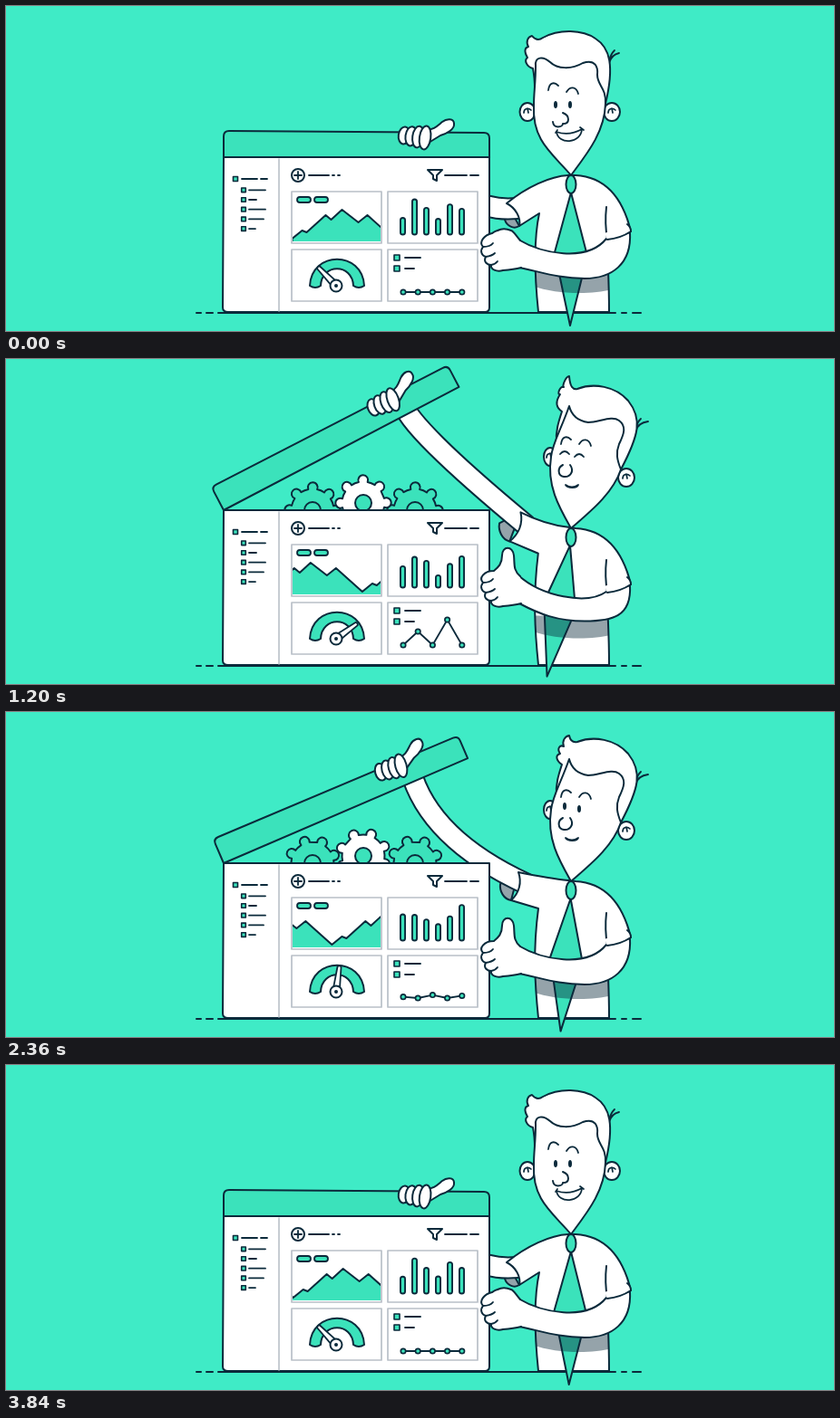
Animation, 913 px wide and 359 px high, one loop 3880 ms. Source, as an HTML page with a canvas:

```html
<!DOCTYPE html>
<html lang="en">
<head>
<meta charset="utf-8">
<title>Dashboard box</title>
<style>
html, body { margin: 0; width: 100%; height: 100%; overflow: hidden; background: #3febc6; }
canvas { display: block; }
</style>
</head>
<body>
<canvas width="913" height="359"></canvas>
<script>
const ctx = document.querySelector('canvas').getContext('2d');
const LOOP = 3880, STEP = 40;
const BG = '#3febc6', GREEN = '#3be2bb', INK = '#0b2a3b', WHITE = '#fff', PALE = '#b9c0c8', SHADE = '#94a4ab';
const rad = deg => deg * Math.PI / 180;
const lerp = (a, b, k) => a + (b - a) * k;

// Smooth step from 0 to 1 between two times, and a rise followed by a fall.
function ease(t, from, to) {
  const u = Math.max(0, Math.min(1, (t - from) / (to - from)));
  return u * u * (3 - 2 * u);
}
const pulse = (t, a, b, c, d) => ease(t, a, b) - ease(t, c, d);

function swing(t, start, size) {
  const s = t - start;
  return s < 0 ? 0 : size * Math.exp(-s / 350) * Math.sin(Math.PI * s / 600);
}

// Blends two path strings of equal structure.
function mix(a, b, k) {
  const other = b.match(/-?[\d.]+/g);
  let i = 0;
  return a.replace(/-?[\d.]+/g, n => lerp(+n, +other[i++], k).toFixed(2));
}

function shape(d, fill, stroke = INK, width = 2) {
  const path = new Path2D(d);
  if (fill) { ctx.fillStyle = fill; ctx.fill(path); }
  if (stroke) { ctx.strokeStyle = stroke; ctx.lineWidth = width; ctx.stroke(path); }
}
const line = (d, width = 1.8, color = INK) => shape(d, null, color, width);

function oval(x, y, rx, ry, fill, width = 2, tilt = 0) {
  ctx.beginPath();
  ctx.ellipse(x, y, rx, ry, rad(tilt), 0, 7);
  ctx.fillStyle = fill;
  ctx.fill();
  if (width) { ctx.strokeStyle = INK; ctx.lineWidth = width; ctx.stroke(); }
}

function at(x, y, deg, draw) {
  ctx.save();
  ctx.translate(x, y);
  ctx.rotate(rad(deg));
  draw();
  ctx.restore();
}

function gear(x, y, fill, turn) {
  const r = 23.5, p = deg => `${r * Math.sin(rad(deg))} ${-r * Math.cos(rad(deg))}`;
  let d = '';
  for (let a = 0; a < 360; a += 45)
    d += `${a ? `A${r} ${r} 0 0 1` : 'M'} ${p(a - 12)} A5.4 5.4 0 1 1 ${p(a + 12)}`;
  at(x, y, turn, () => shape(d + 'Z', fill));
  oval(x, y, 9, 9, GREEN);
}

function square(x, y, s) {
  shape(`M${x - s / 2} ${y - s / 2}h${s}v${s}h${-s}Z`, GREEN, INK, 1.6);
}

// A repeating ridge that scrolls by one span per loop.
function areaChart(t) {
  const ridge = [[0, 257], [11, 248], [16, 250], [37, 231], [43, 236], [55, 225], [73, 239], [83, 231]];
  const span = 112, start = 315.5 - span * t / LOOP;
  let d = '';
  for (let n = 0; n < 3; n++)
    for (const [x, y] of ridge) d += `L${start + n * span + x} ${y} `;
  ctx.save();
  ctx.beginPath();
  ctx.rect(316, 206, 97, 54);
  ctx.clip();
  shape(`M${start} 300 ${d}L${start + 330} 300Z`, GREEN);
  ctx.restore();
  for (const x of [321, 340]) shape(`M${x + 3} 211h9a3 3 0 0 1 0 6h-9a3 3 0 0 1 0 -6Z`, GREEN, INK, 1.8);
}

// Each bar swings around its middle height with its own delay.
function barChart(t) {
  [[228, 0], [218.5, 485], [226.5, 600], [233, 200], [221, 310], [218, 940]].forEach(([mid, delay], i) => {
    const top = mid + 3 + 5.5 * Math.cos(2 * Math.PI * (t - delay) / 970);
    const bar = `M${437.5 + 13 * i} ${top}V250`;
    line(bar, 7);
    line(bar, 3.2, GREEN);
  });
}

function gauge(t) {
  shape('M335 309C337 270 393 270 395 309Q389 313 383 309C382 284 348 284 347 309Q341 313 335 309Z', GREEN);
  const angle = -44 + 107 * pulse(t % 1940, 60, 800, 1060, 1840);
  at(364, 309, angle, () => shape('M-3.5 -4L-2 -28Q0 -30 2 -28L3.5 -4Z', WHITE, INK, 1.8));
  oval(364, 309, 6.5, 6.5, WHITE);
  oval(364, 309, 2, 2, INK, 0);
}

function lineChart(t) {
  const early = pulse(t, 400, 1140, 1240, 1820), late = pulse(t, 2160, 2920, 3020, 3740);
  const pts = [8 * late, 15 * early, 20 * late, 28 * early, 15 * late].map((rise, i) => [438 + 16.2 * i, 316 - rise]);
  line('M' + pts.join('L'));
  for (const [x, y] of pts) oval(x, y, 2.7, 2.7, GREEN, 1.7);
  square(431, 278, 6);
  square(431, 290, 6);
  line('M440 278h17M440 290h10');
}

function box(t) {
  shape('M240 167H533V333Q533 338 528 338H245Q239 338 239 333Z', WHITE);
  line('M301 169V337', 1.6, PALE);
  square(253, 191, 5);
  line('M260 191h17M281 191h7');
  [18, 8, 18, 16, 7].forEach((length, i) => {
    const y = 203.3 + 10.7 * i;
    square(262, y, 4.6);
    line(`M268 ${y}h${length}`);
  });
  oval(322, 187, 7, 7, WHITE);
  line('M318 187h8M322 183v8M334 187h22M360 187h2M366 187h2M484 187h24M512 187h9');
  shape('M465 181h16l-6 6v6l-4 -2v-4Z', WHITE);
  areaChart(t);
  barChart(t);
  for (const x of [315, 421])
    for (const y of [205, 269]) line(`M${x} ${y}h99v57h-99Z`, 1.7, PALE);
  gauge(t);
  lineChart(t);
}

function lid(angle) {
  at(240, 167, -angle, () => {
    shape('M0 0V-23Q0 -29 6 -29L287 -27Q293 -27 293 -21V0Z', GREEN);
    shape('M222 -30C232 -30 236 -35 241 -39C246 -43 254 -43 254 -37C255 -31 246 -26 239 -24L226 -16Z', WHITE);
    for (let i = 0; i < 4; i++) oval(199 + 7.7 * i, -24 + .8 * i, 6.2, 9.5 + 1.2 * i, WHITE, 2, 8);
  });
}

function raisedArm(angle, raise) {
  const c = Math.cos(rad(angle)), s = Math.sin(rad(angle)), bend = raise ** 3;
  const arm = `M${240 + 230 * c - 14 * s} ${167 - 230 * s - 14 * c}
    Q${500 - 34 * bend} ${236 - 96 * bend} 574 ${lerp(222, 190, raise)}`;
  shape(mix('M552 218L566 243C560 247 552 243 550 236Z', 'M565 177L557 208C549 207 544 198 545 190Z', raise), SHADE);
  ctx.lineCap = 'butt';
  line(arm, 25);
  line(arm, 21, WHITE);
  ctx.lineCap = 'round';
}

function body(raise, tie, lift) {
  const sleeve = mix('M620 187C600 188 574 200 552 218C562 223 568 234 566 243L588 229',
                     'M620 186C600 184 580 180 565 177C569 188 566 200 557 208L587 217', raise);
  const shirt = sleeve + 'C581 262 583 300 587 338H665C665 300 663 280 663 257L689 249C682 220 666 189 628 187Z';
  shape(shirt, WHITE);
  at(623, 200, tie, () => shape('M0 6L18 76L-1 153L-18 72Z', GREEN));
  oval(623, 197, 5.5, 10, GREEN);
  ctx.save();
  ctx.clip(new Path2D(shirt));
  const y = 312 - lift * .45;
  shape(`M580 ${y - 20}H668V${y + 1}C645 ${y + 7} 608 ${y + 7} 580 ${y - 3}Z`, 'rgba(11,42,59,.43)', null);
  ctx.restore();
  line('M662 222Q660 240 663 257', 2);
}

function thumbArm(lift, thumb) {
  const half = lift * .6;
  shape(`M565 ${258 - lift}C590 ${273 - half} 640 ${284 - half} 662 257L688 250C690 285 668 ${301 - half} 638 ${301 - half}C608 ${301 - half} 588 ${293 - half} 566 ${289 - lift}`, WHITE);
  const cuff = 'M663 258C674 257 683 253 689 249Q689 244 685 241';
  shape(cuff + 'L660 251Z', WHITE, null);
  line(cuff, 2);
  at(0, -lift, 0, () => {
    const top = mix('M567 259C561 252 560 249 557 248C552 246 546 246 542 248C538 249 538 250 536 251',
                    'M567 259C559 252 561 246 560 236C559 225 547 225 547 236C547 245 543 249 538 253', thumb);
    shape(top + 'C527 253 521 261 526 266C522 271 525 276 529 277C526 283 531 286 535 286C534 291 541 294 548 292Q560 291 568 289', WHITE);
    line('M526 266q8 0 11 -4M529 277q7 -1 10 -4M535 286q5 -1 7 -4');
  });
}

function ear(x, y, rx) {
  oval(x, y, rx, 10, WHITE);
  line(`M${x - 4} ${y + 1}c0 -5 5 -6 8 -3m-4 -2l1 5`, 1.7);
}

function mouth(x, y, smile) {
  const w = 7 + 7 * smile, deep = 4 + 9 * smile;
  shape(`M${x - w} ${y}Q${x} ${y + 5} ${x + w} ${y - 3 * smile}C${x + w - 1} ${y + deep} ${x - w + 2} ${y + deep + 2 * smile} ${x - w} ${y}Z`, WHITE, INK, 1.8);
  if (smile > .4) line(`M${x + w - 2} ${y - 5}l4 3M${x - w - 1} ${y + 1}l2 -3`, 1.7);
}

function head(turn, tuft, smile, blink) {
  const go = (a, b) => lerp(a, b, turn), up = 7 * tuft;
  ear(go(575, 600), go(117, 108), go(8.5, 7));
  ear(go(668, 684), go(117, 131), 9);
  line(`M${go(665, 694)} ${go(63, 80)}c2 -7 6 -10 ${go(11, 14)} -11m-${go(11, 14)} 8q2 -7 6 -11`);
  shape(mix(
    'M583 92C583 82 582 74 581 69C574 67 571 60 575 57C571 50 572 46 576 45C573 40 575 34 580 33C584 38 588 38 592 35C610 25 636 26 650 36C666 46 671 66 661 108',
    `M607 92C606 80 609 70 613 58C607 54 605 48 611 ${46 - up}C607 40 611 ${36 - up} 615 ${38 - up}C613 32 616 ${27 - up} 621 ${26 - up}C622 31 625 34 630 33C648 26 672 30 686 46C702 66 698 84 678 122`, turn), WHITE);
  shape(mix(
    'M584 66C583 56 592 55 600 62C608 70 624 70 636 63C650 58 653 68 652 76C652 88 662 90 661 108C660 140 640 164 623 187C604 164 580 150 582 110C582 95 584 85 584 66Z',
    'M621 52C623 60 628 68 642 70C654 70 668 62 676 68C684 74 682 82 676 94C672 104 674 112 678 122C670 146 650 164 623 187C610 164 596 140 601 108C603 92 612 78 621 52Z', turn), WHITE);
  line(`M${go(598, 612)} ${go(93, 94)}c1 -8 6 -10 11 -5M${go(618, 632)} ${go(95, 94)}c4 -7 11 -6 13 2`);
  line(mix('M614 118C622 121 622 130 614 130C614 134 604 136 603 128', 'M622 117C627 124 622 131 615 130C608 129 608 120 614 117', turn), 2);
  for (const [x, y] of [[go(606, 616), go(109, 104)], [go(622, 632), go(109, 107)]]) {
    if (blink) line(`M${x - 5} ${y + 1}q5 -6 10 0`);
    else oval(x, y, 2, 4, INK, 0);
  }
  mouth(go(621, 624), 139, smile);
}

function draw(t) {
  const angle = 27.7 * ease(t, 730, 1210) - 4.4 * ease(t, 1220, 1640) - 23.3 * ease(t, 2820, 3325);
  const raise = angle / 23.3;
  const turn = pulse(t, 760, 1160, 1360, 1640) + pulse(t, 1740, 1980, 3000, 3340);
  const smile = 1 - pulse(t, 760, 1120, 2560, 3280);
  const lift = 19 * pulse(t, 800, 1180, 1220, 1560);
  const tie = swing(t, 960, 20) + swing(t, 1900, 20) + swing(t, 3020, -6);
  const sink = 34 * (1 - ease(angle, 0, 14)), spin = 22.5 - .0985 * (t - 1880);
  const blink = Math.abs(t - 1180) < 100 || Math.abs(t - 1880) < 100;

  ctx.fillStyle = BG;
  ctx.fillRect(0, 0, 913, 359);
  ctx.lineCap = ctx.lineJoin = 'round';
  line('M210 339h5M221 339h7M234 339h438M679 339h5M691 339h9', 2);
  if (angle > .1) {
    gear(338, 167 + sink, GREEN, -spin);
    gear(451, 167 + sink, GREEN, -spin);
    gear(394, 159 + sink, WHITE, spin);
  }
  raisedArm(angle, raise);
  body(raise, tie, lift);
  box(t);
  lid(angle);
  thumbArm(lift, pulse(t, 760, 1160, 2960, 3320));
  head(turn, pulse(t, 960, 1180, 1220, 1400), smile, blink);
}

function tick() {
  draw(Math.floor(performance.now() % LOOP / STEP) * STEP);
  requestAnimationFrame(tick);
}
tick();
</script>
</body>
</html>
```
